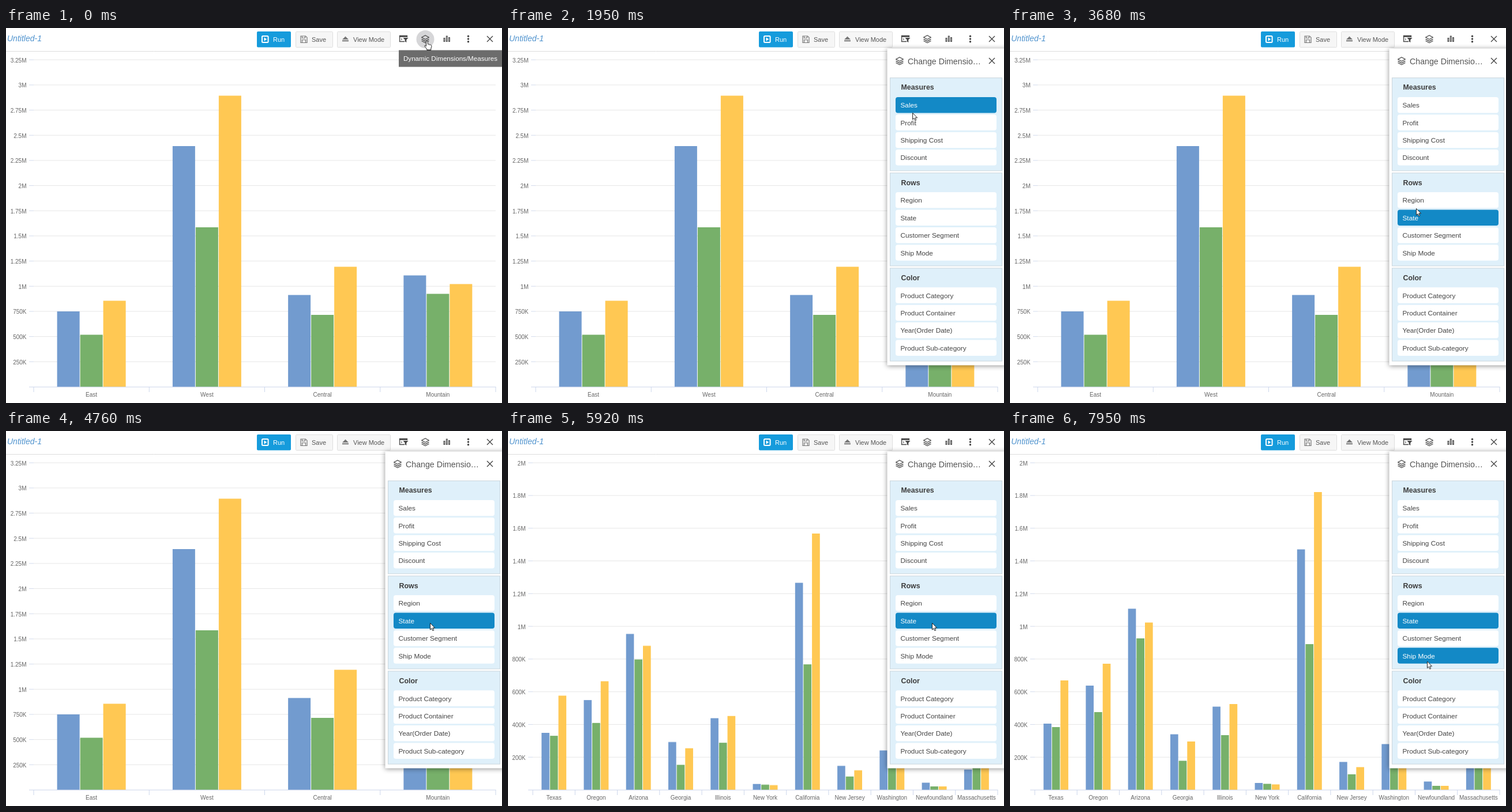
Animation of 860x651 px, one loop 8000 ms. Source, as an HTML page:

```html
<!DOCTYPE html>
<html lang="en">
<head>
<meta charset="utf-8">
<title>Dynamic dimensions</title>
<style>
html, body { margin: 0; width: 100%; height: 100%; overflow: hidden; background: #fff; }
svg { display: block; width: 860px; height: 651px; }
text { font-family: "Liberation Sans", Arial, sans-serif; }
.axis { font-size: 10px; fill: #666; }
.btn { font-size: 11px; fill: #555; }
.head { font-size: 12.4px; font-weight: bold; fill: #3c3c3c; }
.item { font-size: 11.8px; fill: #444; }
.grow { transform-origin: 0 623px; }
.shadow { filter: drop-shadow(0 1px 4px rgba(0, 0, 0, .45)); }
</style>
</head>
<body>
<svg id="stage" viewBox="0 0 860 651">
  <defs>
    <g id="layers" fill="none" stroke="#444" stroke-width="1.3" stroke-linejoin="round">
      <path d="M0-6.3L6.4-2.8 0 .7-6.4-2.8Z"/>
      <path d="M-6.4.4L0 3.9 6.4.4M-6.4 3.2L0 6.7 6.4 3.2"/>
    </g>
    <path id="cross" d="M-5-5L5 5M5-5L-5 5" stroke="#444" stroke-width="1.4"/>
  </defs>

  <g id="charts"></g>

  <g id="toolbar">
    <path d="M0 40.5H860" stroke="#dcdcdc"/>
    <text x="2" y="23" font-size="14" font-style="italic" fill="#4f93ce">Untitled-1</text>
    <rect x="435" y="6" width="59" height="27.5" rx="2" fill="#159bdc"/>
    <rect x="444" y="14" width="10.6" height="11" rx="1.5" fill="none" stroke="#fff" stroke-width="2"/>
    <path d="M447.5 16.3L452.2 19.5 447.5 22.7Z" fill="#fff"/>
    <text x="463" y="23.5" class="btn" style="fill:#fff">Run</text>
    <g fill="#f6f6f6" stroke="#dedede">
      <rect x="502.5" y="6.500" width="64" height="27" rx="1"/>
      <rect x="574.5" y="6.500" width="92" height="27" rx="1"/>
    </g>
    <g fill="none" stroke="#777" stroke-width="1.2">
      <path d="M511 14H519.5L522 16.500V25.500H511Z"/>
      <path d="M513.500 14V17.500H518.500V14M513.500 25.500V20.500H519.500V25.500"/>
    </g>
    <text x="530" y="23.500" class="btn">Save</text>
    <path d="M583 20L588.500 14.500 594 20ZM583 21.300H594V23.300H583Z" fill="#777"/>
    <text x="602" y="23.500" class="btn">View Mode</text>
    <path d="M691 23.500H682.500V13.500H695.500V16" fill="none" stroke="#444" stroke-width="1.300"/>
    <path d="M682 13H696V15.800H682ZM688.500 17H697.500L694.300 20.500V25L691.700 23.500V20.500Z" fill="#444"/>
    <path d="M684.500 18L686.500 19.500 684.500 21" fill="none" stroke="#444"/>
    <circle id="halo" cx="727" cy="19.500" r="15.500" fill="#d6d6d8"/>
    <use href="#layers" x="727" y="19"/>
    <path d="M758.500 17H761.500V24H758.500ZM762.800 13.500H765.800V24H762.800ZM767 16H770V24H767Z" fill="#555"/>
    <path d="M760 18.500V22.500M764.300 15V22.500M768.500 17.500V22.500" stroke="#ccc" stroke-width=".7"/>
    <g fill="#444">
      <circle cx="801.500" cy="14.300" r="1.700"/>
      <circle cx="801.500" cy="19" r="1.700"/>
      <circle cx="801.500" cy="23.700" r="1.700"/>
    </g>
    <use href="#cross" x="839" y="19"/>
  </g>

  <g id="tip">
    <path d="M681 38.500H860V67.500H681Z" fill="#6c6c6c"/>
    <text x="689" y="57" font-size="11.600" fill="#fff">Dynamic Dimensions/Measures</text>
  </g>

  <g id="panel">
    <rect x="657.500" y="35.500" width="206" height="550" fill="#fff" class="shadow"/>
    <use href="#layers" x="679" y="57"/>
    <text x="693" y="62.500" font-size="14.200" fill="#555">Change Dimensio…</text>
    <use href="#cross" x="839" y="57"/>
  </g>

  <circle class="ring" cx="729.500" cy="22" r="10.500" fill="#808080" fill-opacity=".25"/>
  <circle class="ring" cx="735" cy="333.500" r="10.500" fill="#808080" fill-opacity=".25"/>
  <path id="hand" transform="translate(730 22.500)" fill="#fff" stroke="#222" stroke-linejoin="round"
    d="M-1.500 1.200Q0-.600 1.300 1.200V5.500L6.500 6.800Q8 7.400 8 9.500L6.800 13V15.500H-.200V14L-4 9.500Q-4.500 7.300-2.800 7.800L-1.500 9.200Z"/>
  <g id="arrow">
    <path d="M.5.5V12L3 9.600 4.900 13.700 6.700 12.900 4.900 8.900H8.600Z" fill="#fff" stroke="#222" stroke-linejoin="round"/>
  </g>
</svg>

<script>
const LOOP = 8000, BASE = 623, TOP = 55.2, RIGHT = 849;
const COLORS = ['#729bcf', '#77b06a', '#ffc853'];
const $ = id => document.getElementById(id);

function add(parent, tag, attrs, text) {
  const el = document.createElementNS('http://www.w3.org/2000/svg', tag);
  for (const k in attrs) el.setAttribute(k, attrs[k]);
  if (text) el.textContent = text;
  return parent.appendChild(el);
}

const play = (el, frames) => el.animate(frames, { duration: LOOP, iterations: Infinity });

// Hard-cut visibility between two times.
function show(el, on, off) {
  const at = (t, opacity) => ({ offset: t / LOOP, opacity, easing: 'step-end' });
  const frames = [at(0, on ? 0 : 1)];
  if (on) frames.push(at(on, 1));
  if (off < LOOP) frames.push(at(off, 0));
  frames.push(at(LOOP, off < LOOP ? 0 : 1));
  play(el, frames);
}

function chart({ left, labels, names, tops, bar }) {
  const g = add($('charts'), 'g');
  const rows = labels.length, gap = (BASE - TOP) / rows;
  const start = left + 8, step = (RIGHT - start) / names.length;
  labels.forEach((label, i) => {
    const y = TOP + i * gap;
    add(g, 'path', { d: `M${start} ${y}H${RIGHT}`, stroke: '#e6e6e6' });
    add(g, 'path', { d: `M${left} ${y}h8`, stroke: '#d3dbec' });
    add(g, 'text', { x: left - 4.5, y: y + 4.4, class: 'axis', 'text-anchor': 'end' }, label);
  });
  const bars = add(g, 'g', { class: 'grow' });
  names.forEach((name, i) => {
    const mid = start + step * (i + .5);
    for (let k = 0; k < 3; k++) {
      const y = tops[i * 3 + k];
      add(bars, 'rect', {
        x: mid + (k - 1.5) * bar + .5, y, width: bar - 1, height: BASE - y, fill: COLORS[k]
      });
    }
    add(g, 'text', { x: mid, y: 640, class: 'axis', 'text-anchor': 'middle' }, name);
  });
  let axis = `M${left} ${BASE + .2}H${RIGHT + .5}`;
  for (let i = 0; i <= names.length; i++) axis += `M${start + i * step} ${BASE}v9`;
  add(g, 'path', { d: axis, stroke: '#ccd6eb', fill: 'none' });
  return { g, bars };
}

const regions = chart({
  left: 40, bar: 40,
  labels: ['3.25M', '3M', '2.75M', '2.5M', '2.25M', '2M', '1.75M', '1.5M', '1.25M', '1M', '750K', '500K', '250K'],
  names: ['East', 'West', 'Central', 'Mountain'],
  tops: [492, 532.5, 473.5, 205, 346, 117.5, 463.5, 498, 414.5, 429.5, 461.5, 444.5]
});
const states = chart({
  left: 35, bar: 14.65,
  labels: ['2M', '1.8M', '1.6M', '1.4M', '1.2M', '1M', '800K', '600K', '400K', '200K'],
  names: ['Texas', 'Oregon', 'Arizona', 'Georgia', 'Illinois', 'New York', 'California',
    'New Jersey', 'Washington', 'Newfoundland', 'Massachusetts'],
  tops: [
    508, 514, 433, 442, 488, 404, 308.5, 360, 332.5, 526.5, 572.5, 539,
    478.5, 528, 474, 611, 612.5, 613.5, 205.5, 370, 106, 574.5, 596, 583.5,
    543.5, 560, 555, 608.5, 616, 616, 582, 562, 557
  ]
});
show(regions.g, 0, 5380);
show(states.g, 5530, LOOP);

// Bars rise on a sine ease, refreshed about every 80 ms.
const rise = t => (1 - Math.cos(Math.PI * Math.min(1, Math.max(0, (t - 5500) / 555)))) / 2;
play(states.bars, [0, 5530, 5600, 5680, 5760, 5840, 5920, 5990, 6150, LOOP].map(t => ({
  offset: t / LOOP, transform: `scaleY(${rise(t)})`, easing: 'step-end'
})));

// Times at which a list entry is highlighted.
const lit = {
  Sales: [1795, 1953], Profit: [1953, 2032], 'Shipping Cost': [2032, 2190], Discount: [2190, 2270],
  Region: [3130, 3450], State: [3450, LOOP], 'Customer Segment': [7478, 7793], 'Ship Mode': [7793, LOOP]
};
const sections = {
  Measures: ['Sales', 'Profit', 'Shipping Cost', 'Discount'],
  Rows: ['Region', 'State', 'Customer Segment', 'Ship Mode'],
  Color: ['Product Category', 'Product Container', 'Year(Order Date)', 'Product Sub-category']
};

function entry(parent, y, label, fill, color) {
  const g = add(parent, 'g');
  add(g, 'rect', { x: 672, y, width: 175, height: 27.5, rx: 4, fill });
  add(g, 'text', { x: 680.5, y: y + 18.2, class: 'item', style: `fill:${color}` }, label);
  return g;
}

Object.entries(sections).forEach(([title, items], s) => {
  const top = 86.5 + s * 165.2;
  add($('panel'), 'rect', { x: 662.5, y: top, width: 194, height: 161.3, fill: '#dff0fa', stroke: '#cbd6dc' });
  add($('panel'), 'text', { x: 681.5, y: top + 20.8, class: 'head' }, title);
  items.forEach((label, i) => {
    const y = top + 33.4 + i * 30.4;
    entry($('panel'), y, label, '#fff', '#444');
    if (lit[label]) show(entry($('panel'), y, label, '#1389c6', '#fff'), ...lit[label]);
  });
});

show($('halo'), 0, 1480);
show($('tip'), 0, 1010);
show($('panel'), 1010, LOOP);
show($('hand'), 0, 1480);
show($('arrow'), 1480, LOOP);
const rings = document.querySelectorAll('.ring');
show(rings[0], 390, 620);
show(rings[1], 4530, 4760);

// Pointer path: time, x, y, steps until the next stop.
play($('arrow'), [
  [0, 730, 22, 1], [1400, 730, 22, 11], [2270, 677, 251, 2], [2430, 706, 267, 2],
  [2590, 724, 282, 1], [2740, 724, 283, 1], [3050, 724, 283, 5], [3450, 706, 318, 1],
  [3600, 704, 314, 1], [3680, 704, 313, 5], [4070, 735, 333, 1], [7160, 735, 333, 2],
  [7320, 732, 327, 8], [7950, 723, 399.5, 1], [LOOP, 723, 399.5, 1]
].map(([t, x, y, n]) => ({
  offset: t / LOOP, transform: `translate(${x}px, ${y}px)`, easing: `steps(${n})`
})));
</script>
</body>
</html>
```
